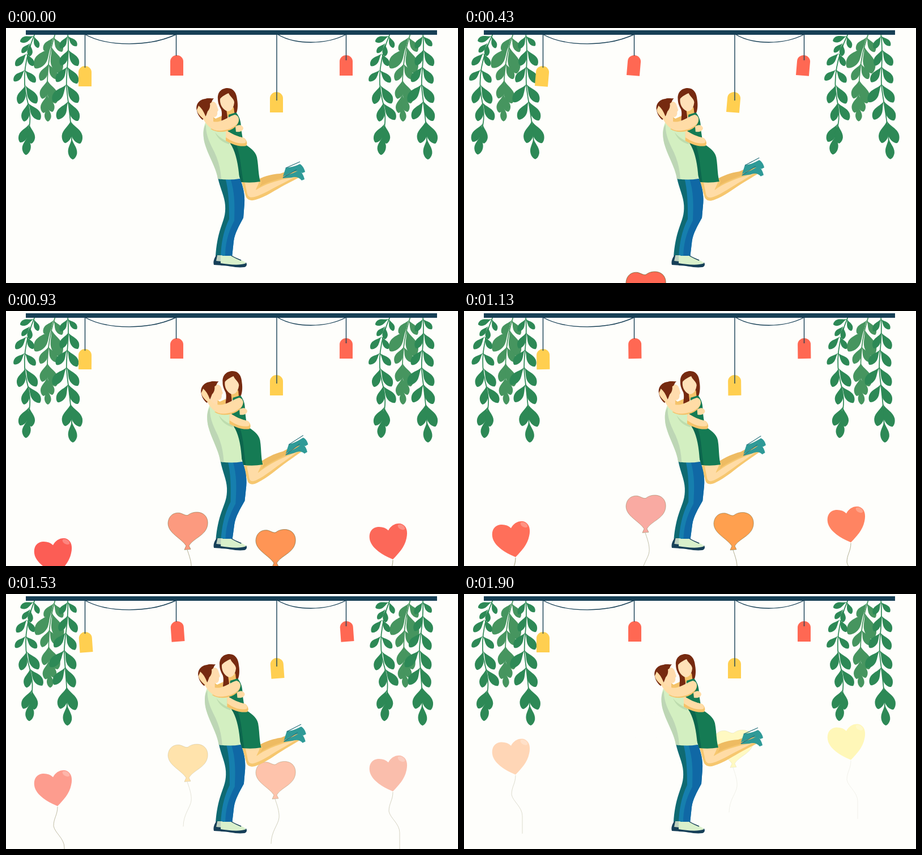
Write an HTML page that moves like this. It is 798 px wide and 450 px high and loops after 1930 ms.

```html
<!DOCTYPE html>
<html lang="en">
<head>
<meta charset="utf-8">
<title>Couple under the garland</title>
<style>
html, body { margin: 0; width: 100%; height: 100%; overflow: hidden; background: #fefefb; }
svg { display: block; width: 798px; height: 450px; }
</style>
</head>
<body>
<svg viewBox="0 0 798 450">
  <g id="balloons"></g>

  <g id="couple">
    <!-- her legs and heels -->
    <g id="legs">
      <path fill="#eebb62" d="M440 270C452 263 466 258 484 257L513 247L518 254L492 266C472 272 455 280 441 288Z"/>
      <path fill="#2f9a97" d="M489 262L494 246C503 247 512 243 519 240C524 243 527 249 528 254L523 256C517 251 510 252 502 256Z"/>
      <path fill="none" stroke="#28707a" stroke-width="1.2" d="M494 247L519 236"/>
      <path fill="#f6c76f" d="M415 268L449 268C453 272 450 276 447 280C460 272 476 268 491 264L513 258L517 264L492 277C475 286 459 298 441 303C432 306 425 303 423 296Z"/>
      <path fill="#ffdca6" d="M421 270L446 269C448 274 442 281 441 286C456 276 476 270 494 266L510 263L489 274C470 283 454 294 439 298C431 300 428 298 426 293Z"/>
      <path fill="#2f9a97" d="M488 265L495 259C505 258 512 253 518 251C523 255 526 262 527 267L522 269C517 263 511 262 504 264Z"/>
      <path fill="none" stroke="#28707a" stroke-width="1" d="M489 264L513 250"/>
    </g>

    <!-- trousers -->
    <path fill="#0f6a72" d="M374 264L396 264L404 300L400 334C389 352 386 375 384 403L370 402C371 385 374 368 379 353C384 338 388 330 387 313C386 297 378 283 374 264Z"/>
    <path fill="#167fae" d="M387 264L413 266C418 278 422 293 421 309L419 335C411 350 404 362 402 376L399 404L379 403C380 381 383 360 394 337C394 312 393 285 387 264Z"/>
    <path fill="#1068a5" d="M396 265L413 266C418 278 422 293 421 309L419 335C411 350 404 362 402 376L399 404L387 404C387 382 391 363 403 340C404 312 404 290 396 265Z"/>

    <!-- his head -->
    <path fill="#ffdcae" d="M355 137C360 129 369 127 372 136L375 145L373 148C374 154 371 158 366 157L369 171L352 171Z"/>
    <path fill="#762a10" d="M337 146C334 135 341 126 352 125C356 123 362 125 367 124C363 128 364 132 360 133C361 139 359 144 356 147L352 158L347 162C342 158 338 152 337 146Z"/>
    <path fill="#f5c36a" d="M366 157L370 160L381 155L380 166L366 169Z"/>

    <!-- her head -->
    <path fill="#762a10" d="M374 125C373 112 382 106 391 106C402 106 407 115 408 126C410 137 409 147 405 154L392 150C392 160 389 168 382 170C378 163 383 154 380 144C377 138 374 133 374 125Z"/>
    <path fill="#f5c36a" d="M389 143L402 140L404 156L391 157Z"/>
    <path fill="#ffe1b8" d="M378 125C381 121 388 117 393 115C396 122 402 124 403 131C402 142 397 147 391 147C382 144 377 134 378 125Z"/>

    <!-- dress -->
    <path fill="#157b54" d="M393 153L406 149C413 157 415 166 415 177L419 203C430 211 440 216 443 228C446 243 445 257 449 271Q433 274 416 272L408 246C402 220 393 207 391 190Z"/>
    <path fill="#0c664d" d="M391 198L407 207C414 225 415 250 419 272L415 272L406 244C402 220 393 210 391 198Z"/>
    <path fill="#ffdca6" d="M405 174C411 169 418 171 419 177C418 183 411 184 406 183Z"/>

    <!-- shirt -->
    <path fill="#d3efc1" d="M353 165C366 168 378 170 386 177L394 188L396 204C405 217 410 238 412 266Q394 269 374 266C371 246 357 225 351 204C347 189 348 174 353 165Z"/>
    <path fill="#bdd6b5" d="M353 170C352 189 361 205 368 219C375 234 379 249 380 267L374 266C371 246 357 225 351 204C347 189 348 176 353 170Z"/>
    <path fill="#bddcae" d="M369 184C377 194 386 198 395 202L394 205C383 202 374 196 369 184Z"/>

    <!-- his arm -->
    <path fill="#f5c36a" d="M388 180C398 187 410 192 420 194C425 197 427 204 424 208C414 210 402 207 388 199Z"/>
    <path fill="#ffdca6" d="M388 180C398 187 410 192 420 194C424 197 425 201 422 203C410 205 400 201 388 193Z"/>

    <!-- her arm -->
    <path fill="#f5c36a" d="M361 178C373 186 389 184 400 178C407 174 412 167 411 159L395 168Z"/>
    <path fill="#ffdca6" d="M340 137C345 141 349 147 352 155C358 164 367 167 376 165C387 162 396 155 404 153C411 154 413 162 409 168C401 178 386 182 372 181C361 179 353 170 348 160C342 155 337 149 337 144C338 142 339 140 340 137Z"/>

    <!-- shoes -->
    <path fill="#163f58" d="M371 401L384 402L383 419L367 418C365 412 368 406 371 401Z"/>
    <path fill="#bdd0c0" d="M373 401L382 401L381 412L371 411Z"/>
    <path fill="#163f58" d="M379 413L424 414C426 417 425 421 421 422C406 424 393 419 379 419Z"/>
    <path fill="#d9f0cb" d="M379 402L399 402C406 407 418 409 424 415C412 420 392 417 379 415Z"/>
    <path fill="none" stroke="#163f58" stroke-width="1.4" d="M398 402C405 406 410 408 415 410"/>
  </g>

  <g id="vines"></g>
  <g id="tags"></g>
  <g fill="none" stroke="#173f55" stroke-width="1.4">
    <path d="M139.500 10V70M300.500 10V49M478 10V128M600.500 10V57"/>
    <path d="M139 11C180 34 255 33 301 11M479 11C510 30 565 30 601 11"/>
  </g>
  <rect x="35" y="4" width="726" height="8" fill="#173f55"/>
</svg>

<script>
const LOOP = 1930;
const $ = id => document.getElementById(id);
const clamp = v => Math.min(1, Math.max(0, v));
const ease = p => (1 - Math.cos(Math.PI * clamp(p))) / 2;

// Interpolate [time, value] keys; mix joins two neighbouring values.
function keyed(keys, t, mix) {
  let i = 0;
  while (i < keys.length - 2 && t > keys[i + 1][0]) i++;
  const [t0, a] = keys[i], [t1, b] = keys[i + 1];
  return mix(a, b, clamp((t - t0) / (t1 - t0)));
}
const mixEase = (a, b, p) => a + (b - a) * ease(p);
const mixColor = (a, b, p) => {
  const part = (c, i) => parseInt(c.substr(1 + 2 * i, 2), 16);
  return `rgb(${[0, 1, 2].map(i => Math.round(part(a, i) + (part(b, i) - part(a, i)) * p))})`;
};

const breeze = [[0, 0], [480, -1], [965, 0], [1020, 0], [1430, 1], [1580, 1], [LOOP, 0]];

// Vines: leaves are [node x, node y, left tip x, y, right tip x, y].
const LEAF = "M0 0C.25-.02 .45-.25 .72-.21C.9-.17 .98-.07 1 0C.96 .12 .75 .24 .52 .19C.33 .14 .2 .03 0 0Z";
const vines = [
  { top: 85, left: 1.6, right: -1.6, color: "#46955f",
    stem: "M87 10C77 40 73 70 73 100S72 130 73 150",
    leaves: [[84, 16, 67, 40, 99, 42], [80, 32, 51, 71, 95, 80], [75, 63, 61, 93, 89, 90],
             [73, 92, 64, 125, 88, 133], [72, 118, 66, 150, 82, 148], [73, 137, 74, 165]] },
  { top: 45, left: 3, right: -1.6, color: "#2d8956",
    stem: "M51 10C34 50 28 90 37 125S42 170 37 200",
    leaves: [[49, 14, 25, 24, 57, 35], [42, 27, 28, 44, 42, 50], [36, 45, 17, 67, 48, 67],
             [33, 74, 14, 94, 52, 96], [34, 101, 23, 134, 54, 133], [39, 132, 32, 165, 60, 162],
             [41, 169, 25, 202, 45, 204], [39, 188, 35, 224]] },
  { top: 109, left: -2.1, right: 2.5, color: "#2d8956",
    stem: "M109 10C113 50 105 80 107 105S116 165 116 205",
    leaves: [[109, 14, 96, 36, 125, 32], [110, 38, 97, 66, 127, 67], [108, 68, 89, 95, 126, 98],
             [107, 99, 83, 130, 127, 132], [110, 129, 91, 161, 127, 164], [114, 164, 104, 203, 131, 204],
             [116, 194, 118, 232]] }
];

function leaf(x, y, tx, ty) {
  const angle = Math.atan2(ty - y, tx - x) * 180 / Math.PI;
  const size = Math.hypot(tx - x, ty - y);
  return `<path d="${LEAF}" transform="translate(${x} ${y}) rotate(${angle}) scale(${size} ${tx < x ? -size : size})"/>`;
}

for (const shift of [0, 627]) {
  $("vines").innerHTML += `<g transform="translate(${shift})">` + vines.map(v =>
    `<g class="vine" fill="${v.color}"><path d="${v.stem}" fill="none" stroke="${v.color}" stroke-width="1.7"/>` +
    v.leaves.map(([x, y, lx, ly, rx, ry]) =>
      leaf(x, y, lx, ly) + (rx ? leaf(x, y, rx, ry) : "")).join("") + "</g>").join("") + "</g>";
}
const vineNodes = document.querySelectorAll(".vine");

// Hanging tags
const tags = [[139.5, 67, "#ffcf50"], [301.5, 48, "#ff6853"], [477.5, 113, "#ffcf50"], [600.5, 48, "#ff6853"]];
$("tags").innerHTML = tags.map(([x, y, c]) =>
  `<path fill="${c}" d="M${x - 11.5} ${y + 36}v-25a11.5 11 0 0 1 23 0v25z"/>`).join("");
const tagNodes = $("tags").children;

// Balloons: y is the top edge at the start of the loop.
const ROUND = "M0 6C6 1 14 0 20 1C31 3 36 12 35 22C33 42 10 46 2 60L5 66L-6 67L-3 60C-12 46 -35 38 -35 20C-34 6 -24 1 -15 2C-9 3 -5 7 0 6Z";
const HEART = "M0 13C4 4 14-1 22 1C32 4 35 14 32 27C29 42 18 54 8 64C-6 58-26 48-32 32C-36 18-30 9-20 7C-12 6-5 8 0 13Z";
const ROUND_TAIL = "M-1 67C2 76 7 89 6 100C5 112-8 124-8 146";
const HEART_TAIL = "M8 65C8 80 1 85 1 99C3 111 20 121 20 137V168";
const CLEAR = "#fefefb";
const times = [430, 730, 1130, 1370, 1670, 1900];
const balloons = [
  { x: 321, y: 494, delay: 0, colors: ["#ff6853", "#ff8a5c", "#f9aaa2", "#ffcfab", "#fff4ac", CLEAR] },
  { x: 476, y: 524.5, delay: 220, colors: ["#ff6853", "#ff8a5c", "#ffa04f", "#fdafa6", "#ffd4b0", "#fff9c2"] },
  { x: 675, y: 514, delay: 200, heart: true, colors: ["#f94b50", "#f94b50", "#ff8462", "#f4a3a0", "#ffd6b6", "#fff7b8"] },
  { x: 83, y: 540, delay: 450, heart: true, colors: ["#f94b50", "#f94b50", "#ff6f5a", "#ff8a72", "#fcaba7", "#ffd6b6"] }
];
for (const b of balloons) {
  b.keys = times.map((t, i) => [t, b.colors[i]]);
  $("balloons").innerHTML += `<g fill="none" stroke="#66602c" stroke-width=".8"><path d="${b.heart ? HEART_TAIL : ROUND_TAIL}"/>` +
    (b.heart
      ? `<path d="${HEART}" stroke="none"/><ellipse cx="23" cy="7" rx="7" ry="4" transform="rotate(30 23 7)" fill="#fff" fill-opacity=".25" stroke="none"/>`
      : `<path d="${ROUND}"/>`) + "</g>";
}
const balloonNodes = $("balloons").children;

function draw(now) {
  const t = now % LOOP;

  const wind = keyed(breeze, t, mixEase);
  vineNodes.forEach((node, i) => {
    const v = vines[i % vines.length];
    node.setAttribute("transform", `rotate(${wind < 0 ? -wind * v.left : wind * v.right} ${v.top} 10)`);
  });
  tags.forEach(([x, y], i) =>
    tagNodes[i].setAttribute("transform", `rotate(${wind * (wind < 0 ? -5 : -4)} ${x} ${y})`));

  balloons.forEach((b, i) => {
    const node = balloonNodes[i];
    node.setAttribute("transform", `translate(${b.x} ${b.y - 0.15 * t})`);
    node.setAttribute("stroke-opacity", clamp(1.25 - (t - b.delay) / 1480));
    node.children[1].setAttribute("fill", keyed(b.keys, t, mixColor));
  });

  // The pair leans from the feet while her legs lift.
  const lean = (1 - Math.cos(2 * Math.PI * t / LOOP)) / 2;
  const k = 0.0288 * lean;
  $("couple").setAttribute("transform", `matrix(1 0 ${-k} 1 ${k * 420} 0)`);
  $("legs").setAttribute("transform", `translate(0 ${94 * lean * 0.21 * 440 / 94}) matrix(1 ${-0.21 * lean} 0 1 0 0)`);

  requestAnimationFrame(draw);
}
requestAnimationFrame(draw);
</script>
</body>
</html>
```
